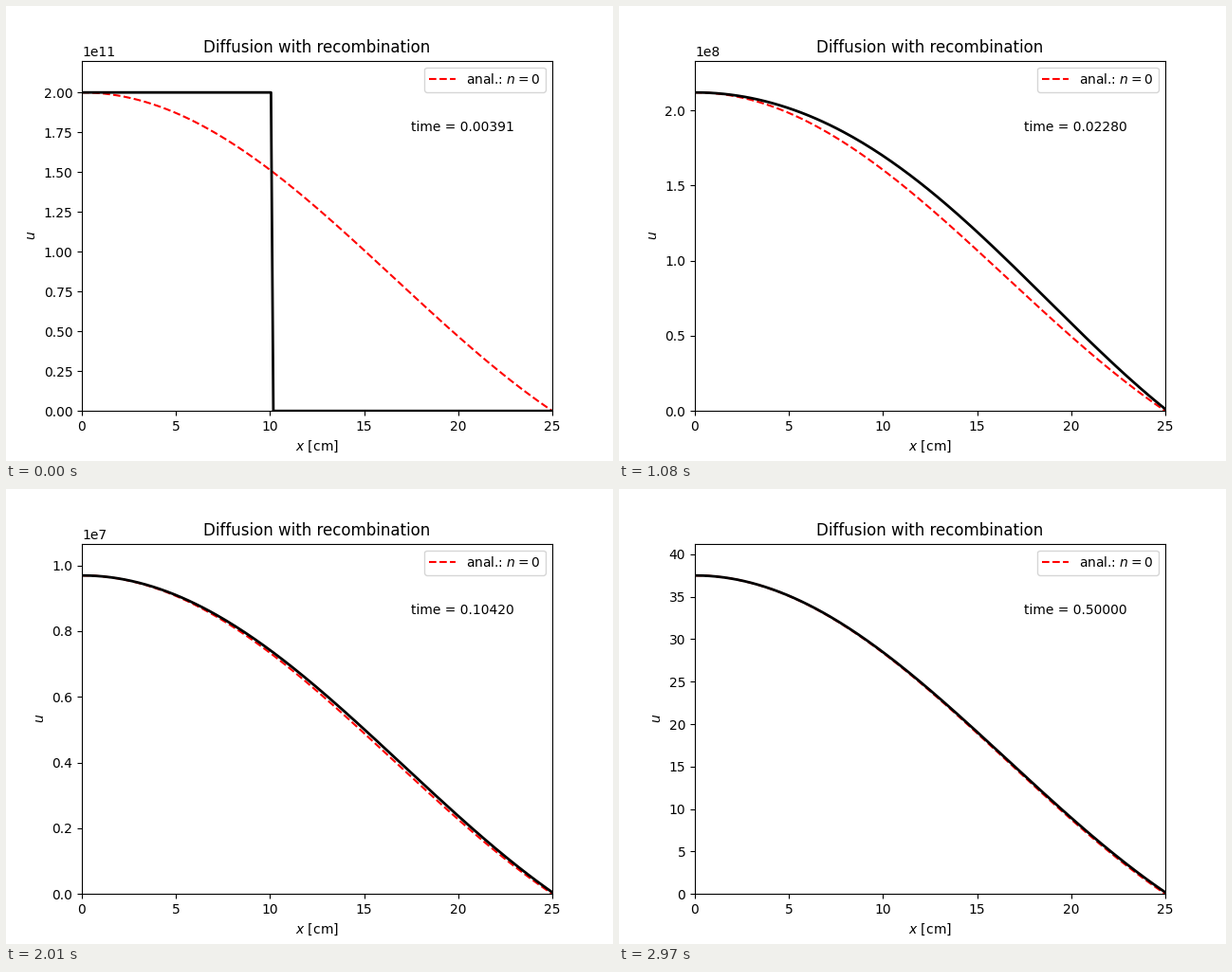
Recreate the animation shown at these times as a matplotlib script. Size 640x480 px, loop 3 s.

```python
import numpy as np
import matplotlib.pyplot as plt
from matplotlib.animation import FuncAnimation

FRAMES, INTERVAL = 100, 30
RADIUS, NX = 25.0, 200
D, ALPHA = 2010.0, 2e-7     # diffusion and recombination coefficients
SUBSTEPS = 100

x = np.linspace(0, RADIUS, NX)
dx = x[1]
times = np.logspace(-8, -1, FRAMES, base=2)

# With v = x*u the spherical Laplacian becomes a plain second difference,
# whose eigenvectors are sines vanishing at x = 0 and one cell past the edge.
k = np.arange(1, NX)
modes = np.sqrt(2 / NX) * np.sin(np.pi * np.outer(k, k) / NX)
rates = 4 * D / dx**2 * np.sin(np.pi * k / (2 * NX))**2


def recombine(u, dt):
    return u / (1 + ALPHA * dt * u)


def advance(u, span):
    """Strang splitting: exact recombination around exact diffusion."""
    h = span / SUBSTEPS
    r = x[1:]
    step = (modes * np.exp(-rates * h)) @ modes
    for _ in range(SUBSTEPS):
        u = recombine(u, h / 2)
        u[1:] = step @ (r * u[1:]) / r
        u[0] = (4 * u[1] - u[2]) / 3
        u = recombine(u, h / 2)
    return u


def solve():
    u = np.where(x < 10.1, 2e11, 0.0)
    profiles = [u]
    for span in np.diff(times):
        u = advance(u, span)
        profiles.append(u)
    return profiles


profiles = solve()
ground = np.sinc(x / RADIUS)

fig, ax = plt.subplots(figsize=(6.4, 4.8), dpi=100)
analytic, = ax.plot(x, ground, "r--", label="anal.: $n=0$")
numeric, = ax.plot(x, ground, "k-", lw=2)
clock = ax.text(0.7, 0.8, "", transform=ax.transAxes)
ax.set_xlim(0, RADIUS)
ax.set_xlabel("$x$ [cm]")
ax.set_ylabel("$u$")
ax.set_title("Diffusion with recombination")
ax.legend(loc="upper right")


def update(i):
    u = profiles[i]
    analytic.set_ydata(u[0] * ground)
    numeric.set_ydata(u)
    ax.set_ylim(0, 1.1 * u[0])
    clock.set_text(f"time = {times[i]:.5f}")
    return analytic, numeric, clock


anim = FuncAnimation(fig, update, frames=FRAMES, interval=INTERVAL,
                     repeat=True, repeat_delay=0, blit=False)
plt.show()
```
